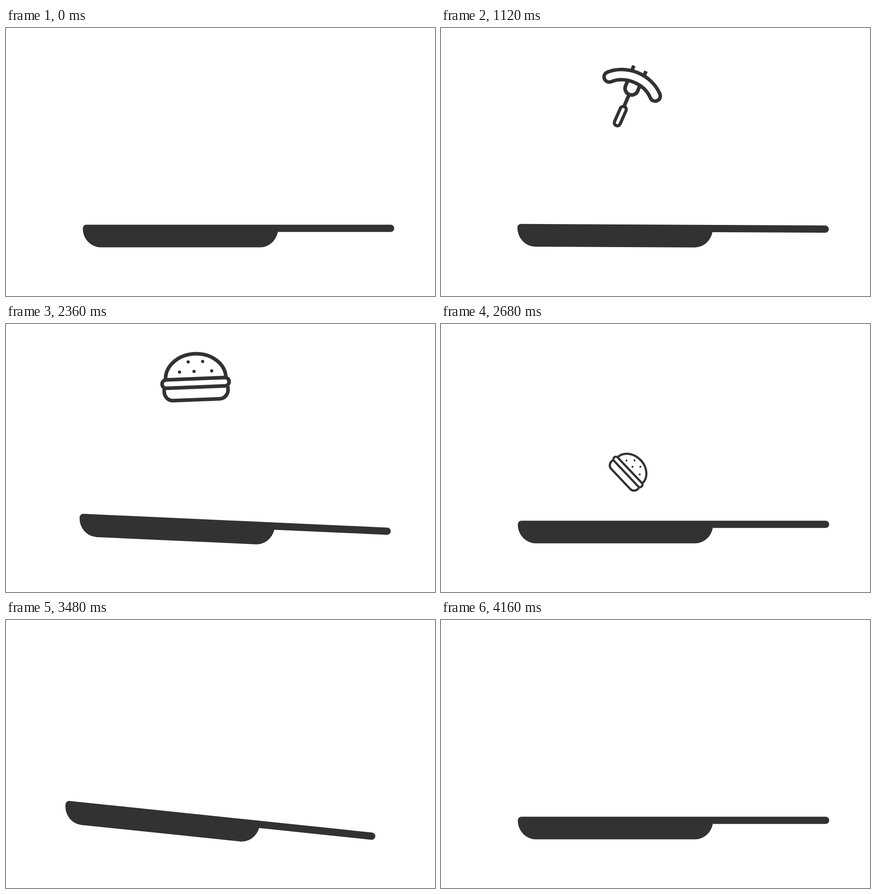
Recreate the animation shown at these times as an HTML page. Size 947x592 px, loop 4200 ms.

```html
<!DOCTYPE html>
<html lang="en">
<head>
<meta charset="utf-8">
<title>Pan loader</title>
<style>
  html, body { margin: 0; height: 100%; overflow: hidden; background: #fff; }
  svg { display: block; width: 100%; height: 100%; }
  .line { fill: none; stroke: #323232; }
  .gap { fill: none; stroke: #fff; }
  .round { stroke-linecap: round; stroke-linejoin: round; }
  .white { fill: #fff; }
  .dark { fill: #323232; }
</style>
</head>
<body>
<svg viewBox="0 0 947 592">
  <g class="food">
    <path class="line" stroke-width="8" d="M425.5 82.5L407 128A14.6 14.6 0 0 0 434 139L452.5 94.5M415 147L404 173"/>
    <path class="line round" stroke-width="20.5" d="M402.3 179.5L389.3 209"/>
    <path class="gap round" stroke-width="6.5" d="M402.3 179.5L389.3 209"/>
    <path class="line round" stroke-width="30.5" d="M371 107.5C409 92 457 112 473 149.5"/>
    <path class="gap round" stroke-width="15" d="M371 107.5C409 92 457 112 473 149.5"/>
  </g>
  <g class="food">
    <g class="line" stroke-width="8" transform="rotate(-2.5 418 118)">
      <path d="M352 121A66.7 55 0 0 1 485.5 121"/>
      <path d="M348 141v6a19 20 0 0 0 19 20.5h103a19 20 0 0 0 19 -20.5v-6"/>
      <rect class="white" x="344" y="121" width="148" height="18.5" rx="9"/>
    </g>
    <path class="line round" stroke-width="7" d="M402 84h.1M434 83h.1M383 106.5h.1M415 105h.1M454 103.5h.1"/>
  </g>
  <g class="food">
    <g class="line" stroke-width="7">
      <path class="white" d="M351.5 117C352 130 353 136 356 144C361 156 377 150 389 151C408 152 424 174 454 174C482 174 507 152 506 128C505 118 502 112 500 100"/>
      <path class="white" d="M351.5 117C354 88 400 62 438 62C473 62 500 82 501 108C501 135 480 155 450 155C425 155 412 134 396 132C380 130 372 136 360 132C354 130 351 124 351.5 117Z"/>
    </g>
    <path class="dark" d="M361 118C366 98 405 71.5 440 71.5C470 71.5 491 88 491 108C491 130 475 146 450 146C425 146 415 126 395 124.5C378 123 359 128 361 118Z"/>
    <circle class="white" cx="455.5" cy="115.5" r="14"/>
    <circle class="dark" cx="455.5" cy="115.5" r="7"/>
  </g>
  <path id="pan" class="dark" d="M177.5 434.5H849a8 8 0 0 1 0 16H600A40 41.5 0 0 1 561 484.5H209A39.5 41.5 0 0 1 169.5 443V442.5A8 8 0 0 1 177.5 434.5Z"/>
</svg>
<script>
  const CYCLE = 1400, DIP = 350, THROW = 700, PEAK = 1050, LAND = 1340, RISE = 330;
  const pan = document.getElementById('pan');
  const foods = [...document.querySelectorAll('.food')];

  // Pose in which each food is drawn: centre and moment within its cycle
  const poses = [
    { x: 413, y: 153, t: 1120 },
    { x: 418, y: 118, t: 960 },
    { x: 429, y: 118, t: 920 }
  ];

  // Distance below the peak: 1 at the pan, 0 at the top
  const drop = t => t < PEAK
    ? ((PEAK - t) / (PEAK - THROW)) ** 3
    : ((t - PEAK) / (LAND - PEAK)) ** 2;

  const spin = t => (t - 976) * 0.153;

  // Falls from 1 to 0 with a soft start and a long tail
  const settle = x => Math.exp(-9.27 * x ** 1.75);

  // Angle and sideways shift of the pan
  function panPose(t) {
    if (t < DIP) {
      const p = 1 - settle(t / DIP);
      return [-15 * p, -45 * p];
    }
    if (t < THROW) {
      const p = ((t - DIP) / (THROW - DIP)) ** 5.5;
      return [-15 + 28.5 * p, -45 + 7 * p];
    }
    const p = settle((t - THROW) / (CYCLE - THROW));
    return [13.5 * p, -38 * p];
  }

  function draw(now) {
    const time = now % (3 * CYCLE);
    const t = time % CYCLE;
    const current = Math.floor(time / CYCLE);

    const [angle, shift] = panPose(t);
    pan.setAttribute('transform', `translate(${shift}) rotate(${angle} 513 442)`);

    const flying = t > THROW && t < LAND;
    foods.forEach((food, i) => {
      const shown = flying && i === current;
      food.style.display = shown ? '' : 'none';
      if (!shown) return;
      const { x, y, t: t0 } = poses[i];
      const d = drop(t);
      const cy = y + RISE * (d - drop(t0));
      food.setAttribute('transform',
        `translate(${x} ${cy}) rotate(${spin(t) - spin(t0)}) scale(${1 - d * d}) translate(${-x} ${-y})`);
    });
  }

  const start = performance.now();
  function loop() {
    draw(performance.now() - start);
    requestAnimationFrame(loop);
  }
  loop();
</script>
</body>
</html>
```
